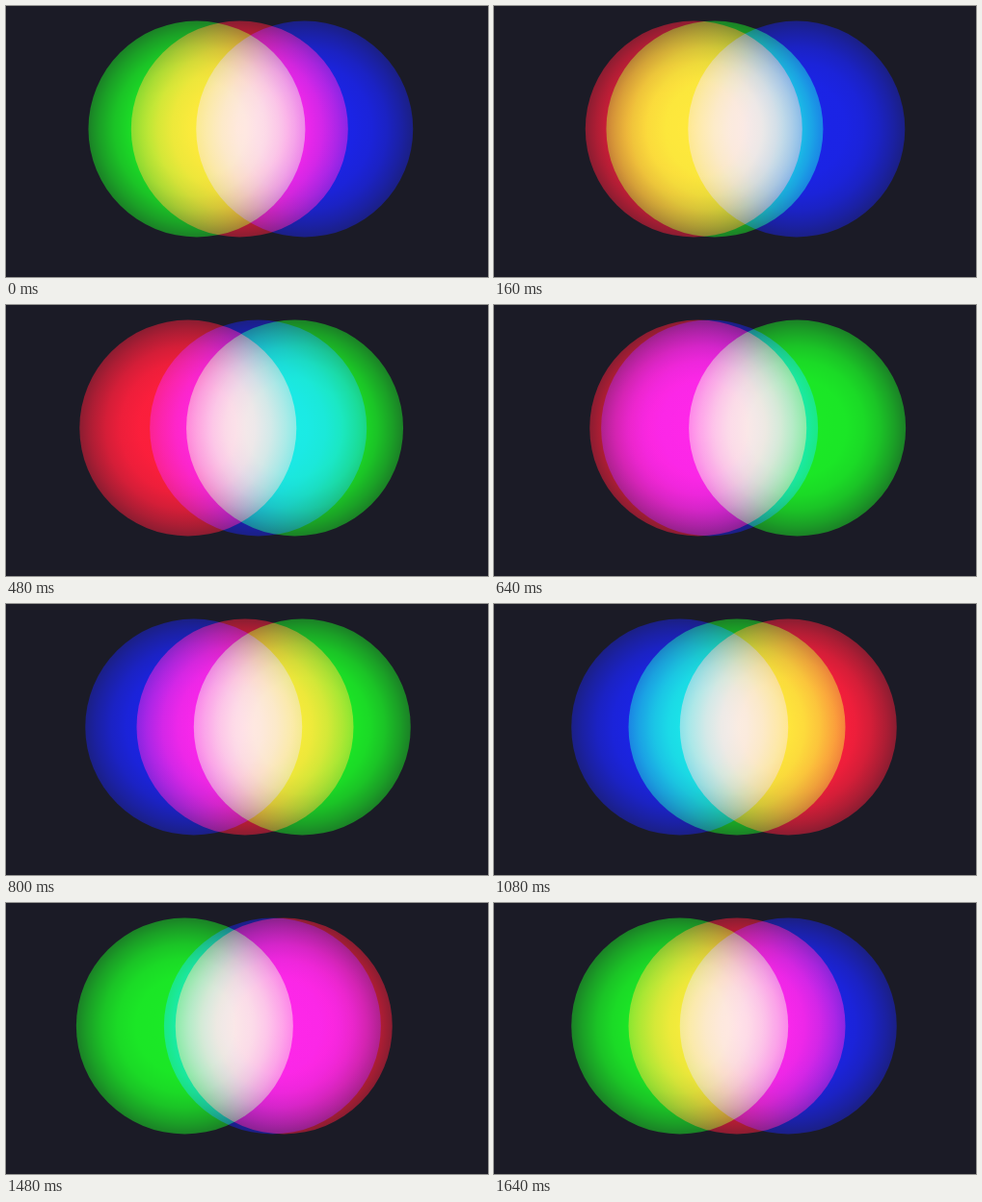
An HTML page with a canvas for the animation above (1.68 s loop, 500 by 282 pixels).

```html
<!DOCTYPE html>
<html lang="en">
<head>
<meta charset="utf-8">
<title>Additive light</title>
<style>
  html, body { margin: 0; width: 100%; height: 100%; overflow: hidden; background: #1b1b26; }
  canvas { display: block; width: 500px; height: 282px; }
</style>
</head>
<body>
<canvas id="stage" width="500" height="282"></canvas>
<script>
const ctx = document.getElementById('stage').getContext('2d');

const LOOP = 1680, STEP = 40;
const CX = 250, CY = 128, RADIUS = 112.5, SWING = 65;
const START = 6.8 * Math.PI / 180;
const LIGHTS = ['255,4,26', '0,232,0', '0,10,228'];
// Radial falloff: [distance, intensity]
const FALLOFF = [[0, 1], [0.45, 0.98], [0.62, 0.92], [0.76, 0.81], [0.9, 0.64], [1, 0.49]];

function drawLight(rgb, x) {
  const glow = ctx.createRadialGradient(x, CY, 0, x, CY, RADIUS);
  for (const [at, level] of FALLOFF) glow.addColorStop(at, `rgba(${rgb},${level})`);
  ctx.fillStyle = glow;
  ctx.beginPath();
  ctx.arc(x, CY, RADIUS, 0, Math.PI * 2);
  ctx.fill();
}

function render(time) {
  const t = Math.floor((time % LOOP) / STEP) * STEP;
  const angle = t / LOOP * Math.PI * 2 + START;
  ctx.globalCompositeOperation = 'source-over';
  ctx.fillStyle = '#1b1b26';
  ctx.fillRect(0, 0, 500, 282);
  ctx.globalCompositeOperation = 'screen';
  LIGHTS.forEach((rgb, i) => {
    drawLight(rgb, CX - SWING * Math.sin(angle + i * Math.PI * 2 / 3));
  });
}

const begin = performance.now();
function tick() {
  render(performance.now() - begin);
  requestAnimationFrame(tick);
}
tick();
</script>
</body>
</html>
```
